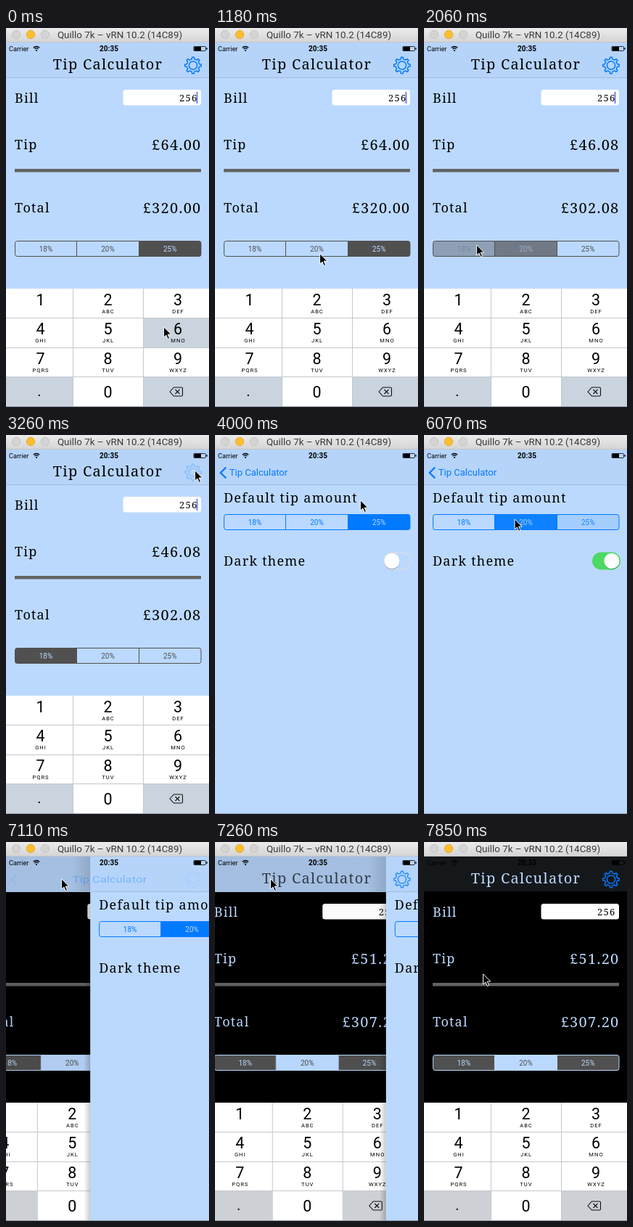
Animation of 280 by 522 pixels, one loop 7990 ms. Source, as an HTML page:

```html
<!DOCTYPE html>
<html lang="en">
<head>
<meta charset="utf-8">
<title>Tip Calculator</title>
<style>
  html, body { margin: 0; width: 100%; height: 100%; overflow: hidden; background: #bbd9ff; }
  svg { display: block; width: 100vw; height: 100vh; font-family: Roboto, Inter, sans-serif; }
  .type { font-family: "Noto Serif", "DejaVu Serif", serif; font-weight: 300; letter-spacing: 1.25px; }
  .mid { text-anchor: middle; }
  .end { text-anchor: end; }
  .abc { font-size: 7.6px; letter-spacing: 1px; text-anchor: middle; }
</style>
</head>
<body>
<svg id="stage" viewBox="0 0 280 522" preserveAspectRatio="none"></svg>
<script>
const LOOP = 7990, TICK = 148.1, LAST = 53;
const SKY = '#bbd9ff', BAR = '#b6d4fa', GRAY = '#505050', BLUE = '#007aff';
const BILL = 256;

// Pointer tip: time, x, y
const POINTER = [
  [0, 217, 411], [150, 217, 411], [440, 219, 470], [590, 214, 462],
  [1030, 148, 318], [1180, 144, 310], [1470, 144, 310], [1770, 72, 298],
  [2210, 72, 298], [2960, 260, 48], [3710, 260, 48], [4000, 200, 89],
  [4150, 200, 110], [4590, 250, 168], [5190, 250, 168], [5920, 125, 115],
  [6220, 124, 115], [6810, 76, 50], [7260, 76, 50], [7850, 81, 181]
];
// Time, then how strongly each segment is filled
const MAIN_SEGS = [
  [0, 0, 0, 1], [1320, 0, .42, .7], [1470, 0, 1, 0],
  [2060, .42, .7, 0], [2210, 1, 0, 0], [7000, 0, 1, 0]
];
const PREF_SEGS = [[0, 0, 0, 1], [6070, 0, .93, .12], [6220, 0, 1, 0]];
const RATES = [[0, 25], [1320, 20], [2060, 18], [7000, 20]];

const clamp = v => Math.max(0, Math.min(1, v));
const lerp = (a, b, k) => a + (b - a) * k;
const easeOut = u => 1 - (1 - clamp(u)) ** 3;
const at = (steps, t) => steps.filter(s => s[0] <= t).pop().slice(1);

function mix(a, b, k) {
  const ch = (c, i) => parseInt(c.slice(i, i + 2), 16);
  return `rgb(${[1, 3, 5].map(i => Math.round(lerp(ch(a, i), ch(b, i), k)))})`;
}

function pointerAt(t) {
  const i = POINTER.findIndex(p => p[0] > t);
  if (i < 0) return POINTER[POINTER.length - 1].slice(1);
  const [a, b] = [POINTER[i - 1], POINTER[i]];
  const u = (t - a[0]) / (b[0] - a[0]), k = u * u * (3 - 2 * u);
  return [lerp(a[1], b[1], k), lerp(a[2], b[2], k)];
}

const rect = (x, y, w, h, fill, more = '') =>
  `<rect x="${x}" y="${y}" width="${w}" height="${h}" fill="${fill}" ${more}/>`;
const text = (x, y, size, str, fill = '#000', cls = '', more = '') =>
  `<text x="${x}" y="${y}" font-size="${size}" fill="${fill}" class="${cls}" ${more}>${str}</text>`;
const path = (d, stroke, width, more = '') =>
  `<path d="${d}" fill="none" stroke="${stroke}" stroke-width="${width}" ${more}/>`;
const group = (inner, x = 0, y = 0, opacity = 1) =>
  `<g transform="translate(${x} ${y})" opacity="${opacity}">${inner}</g>`;

function segments(y, fills, tint, back) {
  const edges = [12.5, 97.5, 183.5, 269];
  let out = '';
  ['18%', '20%', '25%'].forEach((label, i) => {
    const x = edges[i], w = edges[i + 1] - x;
    out += rect(x, y, w, 21, mix(back, tint, fills[i]), 'clip-path="inset(0 round 1.5px)"');
    out += text(x + w / 2, y + 14, 10, label, mix(tint, back, fills[i]), 'mid');
  });
  out += path(`M97.5 ${y}v21M183.5 ${y}v21`, tint, 1);
  return out + rect(12.5, y, 256.5, 21, 'none', `rx="3" stroke="${tint}"`);
}

function keyboard(t, dark) {
  const soft = dark ? '#cdd1d6' : '#c9d4de';
  const letters = ['', 'ABC', 'DEF', 'GHI', 'JKL', 'MNO', 'PQRS', 'TUV', 'WXYZ'];
  const cols = [47.5, 140.5, 237];
  let out = rect(0, 359, 280, 163, '#fff')
    + rect(0, 481, 92, 41, soft) + rect(190, 481, 90, 41, soft);
  if (t < 150) out += rect(190, 400, 90, 40, soft);
  letters.forEach((abc, i) => {
    const x = cols[i % 3], y = 381.5 + Math.floor(i / 3) * 40.5;
    out += text(x, y, 21.5, i + 1, '#000', 'mid') + text(x + .5, y + 11, 7.6, abc, '#000', 'abc');
  });
  out += text(140.5, 508.5, 21.5, 0, '#000', 'mid') + text(46, 507, 20, '.', '#000', 'mid');
  out += path('M226 501l5.5-6h10.5q1.5 0 1.5 1.5v9q0 1.5-1.5 1.5h-10.5zM233.5 498l6 6m0-6l-6 6', '#111', 1.1);
  return out + path('M92.5 359v163M189.5 359v163M0 399.5h280M0 440.5h280M0 480.5h280', '#c3c8cd', 1);
}

// The page dims a little while it is being covered; the keyboard does not.
function mainView(t, dark, s) {
  const ink = dark ? SKY : '#000', tip = BILL * at(RATES, t)[0] / 100;
  const caret = t % 1000 < 560;
  return rect(0, 20, 280, 502, dark ? '#000' : SKY)
    + text(12, 103, 18, 'Bill', ink, 'type')
    + rect(161.5, 85, 107.5, 21.5, '#fff', 'rx="3.5"')
    + text(264.5, 101, 13, BILL, '#000', 'type end')
    + (caret ? rect(262.8, 88, 1.4, 16, '#3c5fe0') : '')
    + text(12, 167, 18, 'Tip', ink, 'type')
    + text(269.5, 167.5, 20, '£' + tip.toFixed(2), ink, 'type end')
    + rect(12, 194, 257, 4.5, '#636363')
    + text(12, 254, 18, 'Total', ink, 'type')
    + text(269.5, 254.5, 20, '£' + (BILL + tip).toFixed(2), ink, 'type end')
    + (dark ? segments(293.5, at(MAIN_SEGS, t), SKY, GRAY) : segments(293.5, at(MAIN_SEGS, t), GRAY, SKY))
    + rect(0, 20, 280, 502, '#000', `opacity="${.1 * s}"`)
    + keyboard(t, dark);
}

function toggle(t) {
  const k = easeOut((t - 4990) / 300), x = lerp(244, 259, k);
  return rect(232.8, 162.3, 37.5, 22.5, mix(SKY, '#4cd964', k),
      `rx="11.2" stroke="${mix('#d6dce5', '#4cd964', k)}" stroke-width="1.4"`)
    + `<circle cx="${x}" cy="174.6" r="10.8" fill="#000" opacity=".16"/>`
    + `<circle cx="${x}" cy="173.5" r="10.6" fill="#fff"/>`;
}

const settingsView = t => rect(0, 20, 280, 502, SKY)
  + rect(-9, 20, 9, 502, 'url(#shade)')
  + text(12, 93, 18, 'Default tip amount', '#000', 'type')
  + segments(109.5, at(PREF_SEGS, t), BLUE, SKY)
  + text(12, 180, 18, 'Dark theme', '#000', 'type')
  + toggle(t);

function gear() {
  const pts = [];
  for (let i = 0; i < 8; i++) {
    for (const [off, r] of [[-.25, 8.8], [-.16, 11.3], [.16, 11.3], [.25, 8.8]]) {
      const a = (i + off) * Math.PI / 4;
      pts.push(`${(Math.sin(a) * r).toFixed(2)} ${(-Math.cos(a) * r).toFixed(2)}`);
    }
  }
  return path(`M${pts.join('L')}Z`, BLUE, 1.5, 'stroke-linejoin="round"')
    + `<circle r="5.6" fill="none" stroke="${BLUE}" stroke-width="1.5"/>`;
}
const GEAR = gear();

// s runs from 0 (calculator) to 1 (settings)
function navBar(t, s) {
  const dark = t > 7400;
  const pressed = t >= 3260 && t < 3700 ? .25 : 1;
  const label = text(0, 56, 13, 'Tip Calculator', BLUE, 'mid');
  const x = Math.min(143, 60 + 203 * (1 - s));
  return rect(0, 20, 280, 48, dark ? '#15181b' : BAR, dark ? '' : 'opacity=".9"')
    + (dark ? '' : rect(0, 68, 280, 1, '#a6bcd8'))
    + (s > 0 ? rect(280 * (1 - s) - 24, 20, 24, 48, 'url(#shade)', 'opacity=".6"') : '')
    + `<g opacity="${clamp(1 - 2 * s)}">${text(140.5, 57, 20, 'Tip Calculator', dark ? SKY : '#000', 'type mid')}</g>`
    + group(GEAR, 258, 51.5, clamp(1 - 1.6 * s) * pressed)
    + group(path('M15.2 44.5l-7.5 7.5 7.5 7.5', BLUE, 2.3), 0, 0, s ** 5)
    + `<g transform="translate(${x}) scale(${1 + .67 * (1 - s)} 1)" opacity="${s * s}">${label}</g>`;
}

const STATUS = text(4, 31.5, 9.2, 'Carrier')
  + path('M37.8 27.2a6 6 0 0 1 8.4 0M39.5 29.1a3.6 3.6 0 0 1 5 0', '#000', 1.3)
  + '<circle cx="42" cy="31" r="1.1"/>'
  + text(142, 32, 10, '20:35', '#000', 'mid', 'font-weight="600"')
  + rect(259, 25.5, 16.5, 6, 'none', 'rx="1" stroke="#000" stroke-width=".8"')
  + rect(259.5, 26, 9.5, 5, '#000') + rect(276.4, 27.2, 1.3, 2.6, '#000');

const light = (x, fill, edge) => `<circle cx="${x}" cy="9" r="5.7" fill="${fill}" stroke="${edge}" stroke-width=".8"/>`;
const TITLE_BAR = rect(0, 0, 280, 20, 'url(#chrome)') + rect(0, 19.3, 280, .7, '#bdbdbd')
  + light(14, '#d4d4d4', '#bfbfbf') + light(34, '#fdbe2f', '#dfa023') + light(54, '#d4d4d4', '#bfbfbf')
  + text(157, 14, 13.4, 'Quillo 7k – vRN 10.2 (14C89)', '#3a3a3a', 'mid');

const DEFS = `<defs>
  <linearGradient id="chrome" x2="0" y2="1"><stop stop-color="#ebebeb"/><stop offset="1" stop-color="#d4d4d4"/></linearGradient>
  <linearGradient id="shade"><stop stop-color="#000" stop-opacity="0"/><stop offset="1" stop-color="#000" stop-opacity=".2"/></linearGradient>
</defs>`;

const ARROW = '<path d="M.6 .8V15l3.3-3 2.4 5.4 2.3-1-2.4-5.3h4.6z" fill="#000" stroke="#fff" stroke-width="1"/>';

function scene(t) {
  const push = easeOut((t - 3480) / 500), pop = easeOut((t - 7032) / 500);
  const s = t < 7000 ? push : 1 - pop;
  return DEFS
    + (s < 1 ? group(mainView(t, t > 7000, s), -84 * s) : '')
    + (s > 0 ? group(settingsView(t), 280 * (1 - s)) : '')
    + navBar(t, s) + STATUS + TITLE_BAR
    + rect(0, 521, 280, 1, '#8e99a6')
    + group(ARROW, ...pointerAt(t));
}

const stage = document.getElementById('stage');
let shown = -1;
const start = performance.now();

function draw() {
  const t = (performance.now() - start) % LOOP;
  const step = Math.min(LAST, Math.floor((t + 25) / TICK));
  if (step !== shown) {
    shown = step;
    stage.innerHTML = scene(step * TICK + 5);
  }
  requestAnimationFrame(draw);
}
draw();
</script>
</body>
</html>
```
